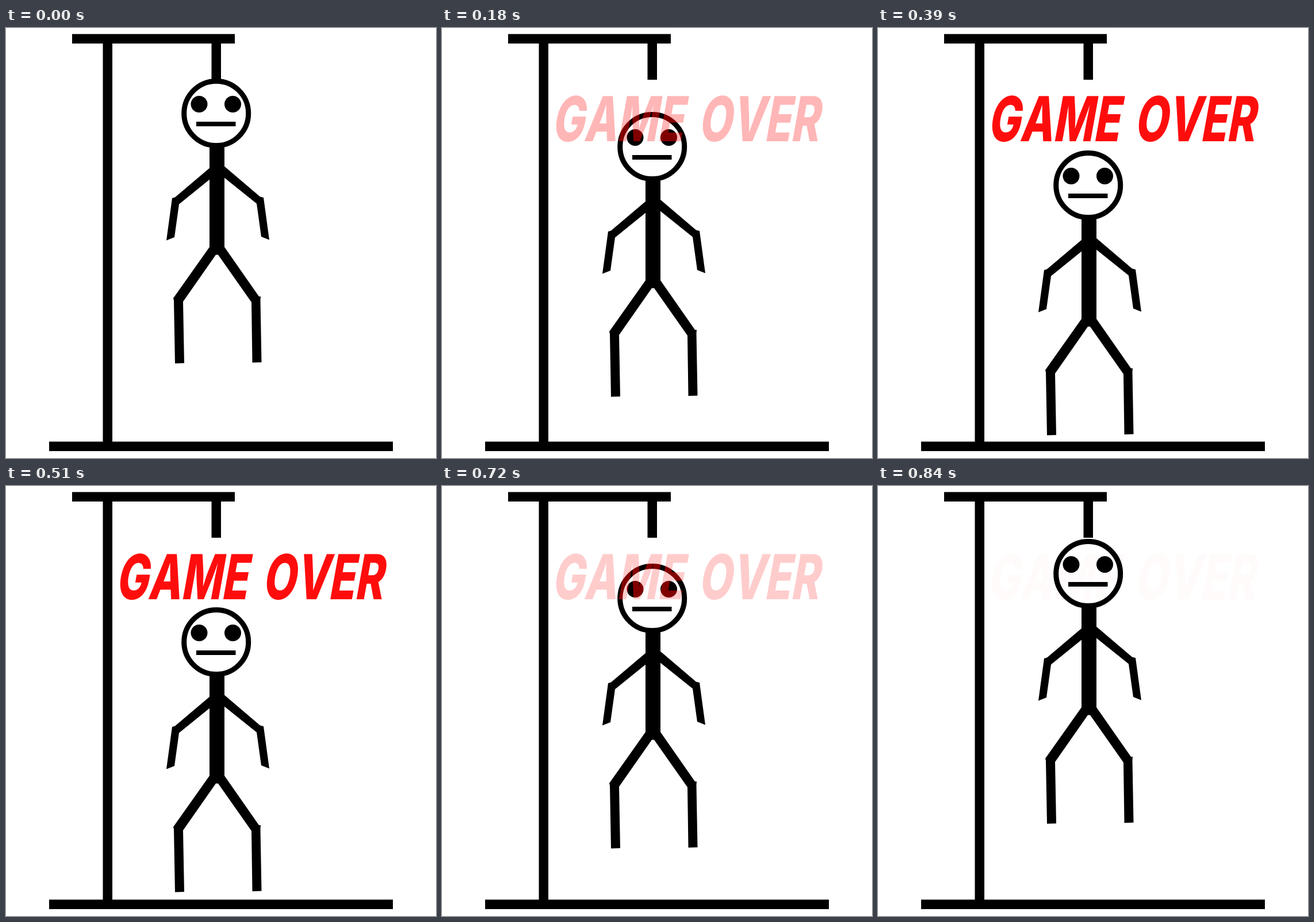
An HTML page with a canvas for the animation above (0.87 s loop, 748 px wide and 748 px high).

```html
<!DOCTYPE html>
<html lang="en">
<head>
<meta charset="utf-8">
<title>Hangman</title>
<style>
  html, body { margin: 0; width: 100%; height: 100%; overflow: hidden; background: #fff; }
  canvas { display: block; }
</style>
</head>
<body>
<canvas width="748" height="748"></canvas>
<script>
const ctx = document.querySelector('canvas').getContext('2d');
const STEP = 30, STEPS = 29;
const clamp = v => Math.max(0, Math.min(1, v));

const gallows = new Path2D('M115 10.5H398V27H374V90H357.5V27H185V719.5H673V736H75V719.5H168.5V27H115Z');
const limbs = new Path2D(
  'M354 204H380V381L440 467H443L442.5 473L444.5 581.5L428.5 582L427 477L369 394.5H365L308 476L310 583L294 583.5L292 474L291 470L354 381Z' +
  'M356 262L301 306.5L293 364L279 369.5L289 296L294 294.5L356 242Z' +
  'M378 239L442 293.5L448 295L458 368.5L444 363L436 305.5L378 259Z' +
  'M331 163H399.5V171H331Z');

function disc(x, y, r) {
  ctx.beginPath();
  ctx.arc(x, y, r, 0, 2 * Math.PI);
}

// Linear fall to the ground, then a slightly faster linear return.
const dropAt = n => Math.max(0, Math.round(Math.min(9.667 * n - 0.5, 10.8 * (28.37 - n))));

const fadeAt = n => clamp(Math.min(n / 11.5, (28.4 - n) / 11.4));

function drawMan(drop) {
  ctx.save();
  ctx.translate(0, drop);
  ctx.fill(limbs);
  for (const x of [336, 394.5]) {
    disc(x, 132.5, 14.5);
    ctx.fill();
  }
  disc(365.7, 148.5, 56);
  ctx.lineWidth = 9;
  ctx.stroke();
  ctx.restore();
}

function drawWord(word, x) {
  ctx.save();
  ctx.transform(0.69, 0, -0.18, 1, x, 197);
  ctx.fillText(word, 0, 0);
  ctx.restore();
}

function drawTitle(fade) {
  if (!fade) return;
  // Blended in linear light; the red over black has only three levels.
  const pale = Math.max(13, 255 * (1 - fade) ** (1 / 2.2));
  const dark = 255 * Math.round(2 * fade ** (1 / 2.2)) / 2;
  ctx.save();
  ctx.font = '800 108px Inter, sans-serif';
  ctx.fontKerning = 'none';
  for (const [mode, red, rest] of [['multiply', 255, pale], ['screen', dark, 0]]) {
    ctx.globalCompositeOperation = mode;
    ctx.fillStyle = `rgb(${red}, ${rest}, ${rest})`;
    drawWord('GAME', 190);
    drawWord('OVER', 445);
  }
  ctx.restore();
}

function draw() {
  const n = Math.floor(performance.now() / STEP) % STEPS;
  ctx.fillStyle = '#fff';
  ctx.fillRect(0, 0, 748, 748);
  ctx.fillStyle = '#000';
  ctx.fill(gallows);
  drawMan(dropAt(n));
  drawTitle(fadeAt(n));
  requestAnimationFrame(draw);
}
draw();
</script>
</body>
</html>
```
